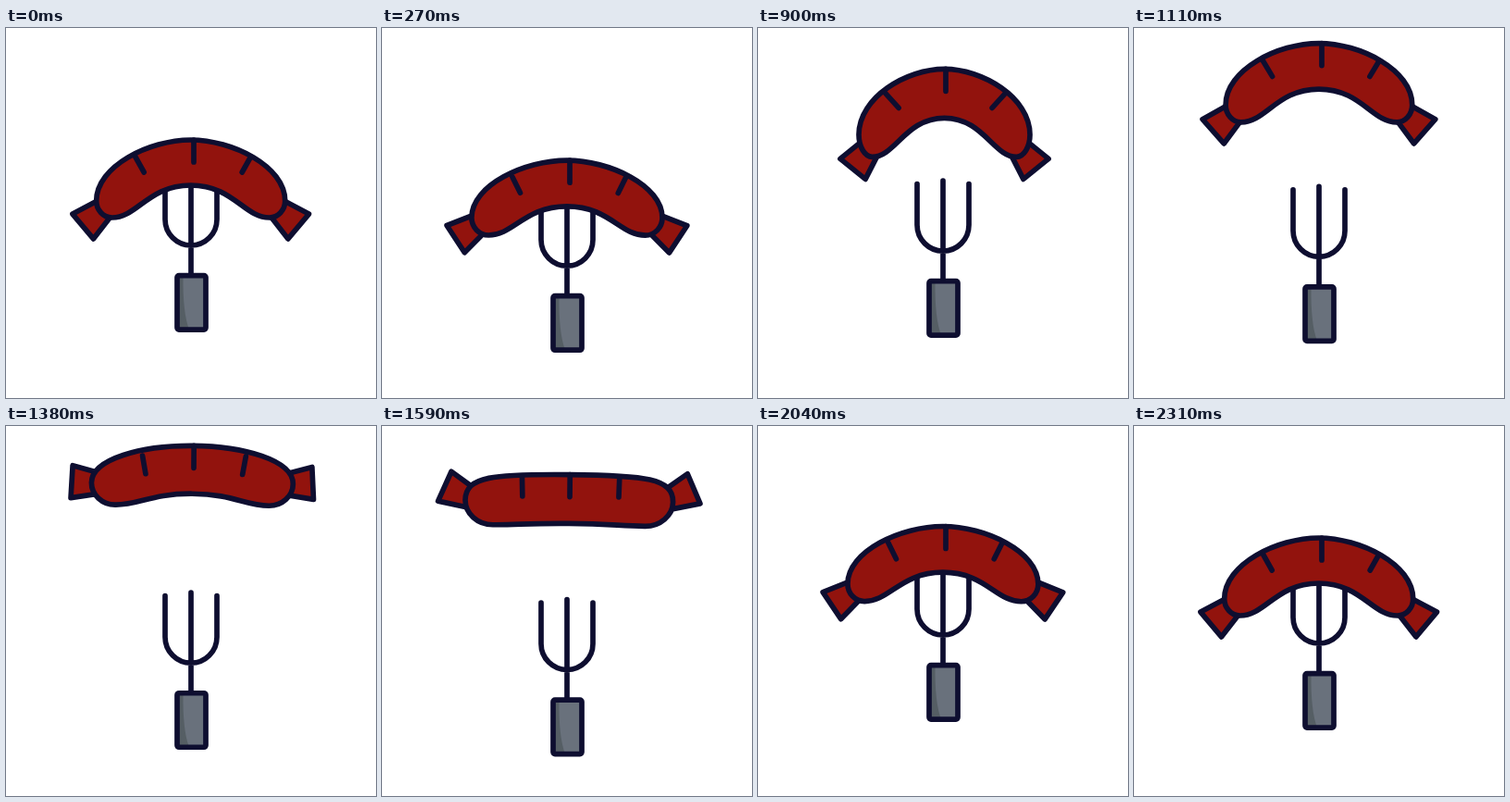
An HTML page for the animation above (4.34 s loop, 400x400 px).

```html
<!DOCTYPE html>
<html lang="en">
<head>
<meta charset="utf-8">
<title>Sausage toss</title>
<style>
  html, body { margin: 0; width: 100%; height: 100%; overflow: hidden; background: #fff; }
  svg { display: block; width: 100%; height: 100%; }
  .ink { stroke: #0e0e30; stroke-width: 5.7; stroke-linecap: round; stroke-linejoin: round; fill: none; }
  .meat { fill: #92130d; }
</style>
</head>
<body>
<svg viewBox="0 0 400 400">
  <g id="fork">
    <path class="ink" d="M172 162.500V207A28 28 0 0 0 228 207V162.500M200 159V268"/>
    <rect x="185" y="267.600" width="31" height="58.500" fill="#69717c"/>
    <path d="M185 268H191.500Q191 308 198 326H185Z" fill="#555e64"/>
    <rect class="ink" x="185" y="267.600" width="31" height="58.500" rx="2"/>
  </g>
  <g id="sausage">
    <path id="tails" class="ink meat"/>
    <path id="body" class="ink meat"/>
    <path id="cuts" class="ink"/>
  </g>
</svg>
<script>
const LOOP = 4340, STEP = 30;
// Moments of the toss
const DIP = 585, CURLED = 900, APEX = 1160, LOW = 1660, FLAT = 1740, CATCH = 1800, END = 2310;
// Heights of the sausage's top edge
const REST = 121, DEPTH = 50, PEAK = 16.5;

const el = id => document.getElementById(id);
const part = (t, from, to) => Math.max(0, (t - from) / (to - from));
const smooth = u => u * u * (3 - 2 * u);
const whip = (u, power) => 1 - (1 - u * u) ** power;

function topAt(t) {
  if (t < DIP) return REST + DEPTH * smooth(t / DIP);
  if (t < APEX) return REST + DEPTH + (PEAK - REST - DEPTH) * whip(part(t, DIP, APEX), 4.8);
  if (t < CATCH) return PEAK + 88.5 * part(t, APEX, FLAT) ** 3;
  // Bounce on the fork and settle
  return REST + 14.4 * Math.cos(Math.PI * (t - CATCH) / 260) * (1 - part(t, CATCH, END) ** 3);
}

function forkAt(t) {
  const lift = topAt(t) - REST;
  if (t < DIP) return lift;
  // Pushes the sausage up, then sinks slowly on its own
  if (t < LOW) return Math.max(lift, 2.5 + 28.5 * part(t, 750, LOW) ** 1.15);
  if (t < CATCH) return 31 - 20.6 * part(t, LOW, CATCH) ** 3;
  return 0.72 * lift;
}

// -1 is curled, 0 at rest, 1 straight
function bendAt(t) {
  if (t < DIP) return 0.1 * Math.sin(Math.PI * t / DIP) ** 2;
  if (t < CURLED) return -smooth(part(t, DIP, CURLED));
  if (t < FLAT) return 1 - 2 * (1 - part(t, CURLED, FLAT)) ** 2;
  return 1 - whip(part(t, FLAT, END), 7.4);
}

function draw(t) {
  const top = topAt(t), bend = bendAt(t);
  const curl = Math.max(0, -bend), flat = Math.max(0, bend), soft = flat ** 0.7;
  const pose = (rest, c, f) => rest + c * curl + f * flat;
  const cx = pose(199.7, 1.8, 2.8);

  // Points are offsets outward from the centre line and down from the top.
  const place = (list, side, x = cx) =>
    list.map(([u, v]) => `${(x + side * u).toFixed(2)} ${(top + v).toFixed(2)}`);
  const mirror = (list, x) => [-1, 1].map(s => `M${place(list, s, x).join('L')}`).join('');

  // Body: widest point (w, wy), lowest point (b, by), middle of the belly
  const w = pose(102, -9.5, 11), wy = pose(66, 5, -40);
  const b = pose(85, -7, -3), by = pose(84, 11, -31);
  const belly = 49 + 4 * curl + 4 * soft;
  const square = flat ** 4, round = 0.55;
  const half = [
    [0, 0], [w * (0.44 + 0.38 * square), 0], [w, 0.43 * wy * (1 - square)],
    [w, wy], [w, wy + round * (by - wy)], [b + round * (w - b), by],
    [b, by], [0.68 * b, by], [0.54 * b, belly], [0, belly]
  ];
  const left = place(half, -1), right = place(half, 1).reverse();
  el('body').setAttribute('d', `M${left[0]}C${left.slice(1).join(' ')}C${right.slice(1).join(' ')}Z`);

  // Tail: a wedge that turns about the middle of its outer edge
  const tx = 116.5 - 17.5 * curl + 19 * soft, ty = pose(93.5, 14.5, -85);
  const turn = pose(40, 11, -68) * Math.PI / 180, cos = Math.cos(turn), sin = Math.sin(turn);
  const corner = (back, across) =>
    [tx - back * cos - across * sin, ty - back * sin + across * cos];
  const tail = [corner(33, -10.5), corner(0, -17.5), corner(0, 17.5), corner(33, 10.5)];
  el('tails').setAttribute('d', mirror(tail));

  const cutY = 18 + 8 * curl - 17 * flat * flat;
  const cut = [[pose(62.5, 2.5, -10.5), cutY], [pose(53, -2.5, -1), cutY + pose(17, -1, 4)]];
  el('cuts').setAttribute('d', mirror(cut, pose(202.2, 0.4, 1.8)) + `M203 ${top}v24`);

  el('sausage').setAttribute('transform', `rotate(${0.6 * flat} ${cx} ${top + 26})`);
  el('fork').setAttribute('transform', `translate(0 ${forkAt(t)})`);
}

const start = performance.now();
function tick() {
  const t = (performance.now() - start) % LOOP;
  draw(Math.min(END, Math.floor(t / STEP) * STEP));
  requestAnimationFrame(tick);
}
tick();
</script>
</body>
</html>
```
